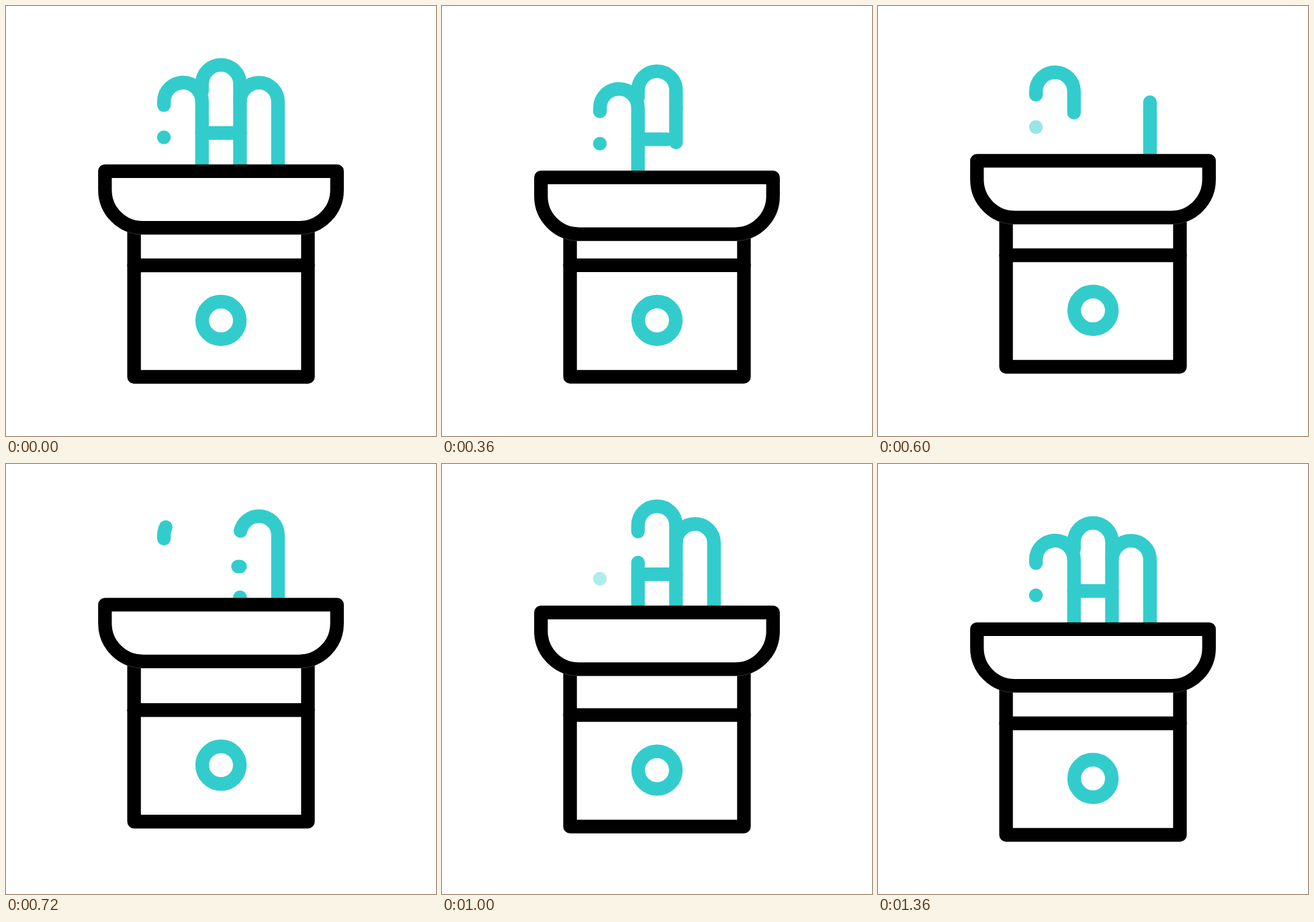
These frames come from a looping animation (640x640 px, 1960 ms). An HTML page:

```html
<!DOCTYPE html>
<html lang="en">
<head>
<meta charset="utf-8">
<title>Fountain</title>
<style>
  html, body { margin: 0; height: 100%; overflow: hidden; background: #fff; }
  svg { display: block; width: 100vw; height: 100vh; }
  path, circle { fill: none; stroke: #000; stroke-width: 20.3; stroke-linecap: round; stroke-linejoin: round; }
  .water { stroke: #3cc; }
  #drop { fill: #3cc; stroke: none; }
  #bowl .rim { fill: #fff; }
  .seam { stroke: #555; stroke-width: .6; stroke-linecap: butt; }
</style>
</head>
<body>
<svg viewBox="0 0 640 640">
  <path id="legs"/>
  <g id="base">
    <path d="M190.6 386H449.4"/>
    <circle class="water" cx="320" cy="468" r="28"/>
  </g>
  <g id="bowl">
    <path class="water" id="right" pathLength="1" d="M404.8 247V142.3A28.25 28.25 0 0 0 348.3 142.3"/>
    <path class="water" id="middle" pathLength="1" d="M348.3 247V116A28.3 28.3 0 0 0 291.7 116V127"/>
    <path class="water" id="bar" pathLength="1" d="M348.3 189H291.7"/>
    <path class="water" id="left" pathLength="1" d="M291.7 247V142.3A28.3 28.3 0 0 0 235.1 142.3V147.5"/>
    <circle id="drop" cx="235" cy="195.5" r="10.2"/>
    <path class="rim" d="M147.3 245.8H492.7V273.7A56.5 56.5 0 0 1 436.2 330.2H203.8A56.5 56.5 0 0 1 147.3 273.7Z"/>
    <path class="seam" d="M180.5 336.2A66.6 66.6 0 0 0 200.8 340.2M459.5 336.2A66.6 66.6 0 0 1 439.2 340.2"/>
  </g>
</svg>
<script>
const LOOP = 1960, STEP = 40;
const el = id => document.getElementById(id);
const smooth = s => s * s * (3 - 2 * s);
const progress = (t, from, to) => Math.min(1, Math.max(0, (t - from) / (to - from)));

// cubic-bezier(.5, 0, .5, 1)
function ease(x) {
  let lo = 0, hi = 1;
  for (let i = 0; i < 20; i++) {
    const s = (lo + hi) / 2;
    if (1.5 * s * (1 - s) + s ** 3 < x) lo = s; else hi = s;
  }
  return smooth(hi);
}

// Each move is [start, end, distance]
const travel = (t, moves) =>
  moves.reduce((sum, [from, to, d]) => sum + (t > from ? d * ease(progress(t, from, to)) : 0), 0);

const bowlMoves = [[80, 400, 9.6], [423, 768, -47.4], [828, 1238, 37.8]];
const baseMoves = [[322, 760, -20], [745, 1325, 20]];

// Each jet is erased from its root, then drawn again: [erase start, end, draw start, end]
const jets = {
  right: [80, 375, 465, 751],
  middle: [268, 563, 672, 1017],
  bar: [268, 563, 672, 1017],
  left: [479, 774, 828, 1238]
};

function trim(id, t) {
  const [e0, e1, d0, d1] = jets[id];
  const erased = t < d0;
  const from = erased ? smooth(progress(t, e0, e1)) : 0;
  const to = erased ? 1 : smooth(progress(t, d0, d1));
  const style = el(id).style;
  style.visibility = to - from > 1e-4 ? 'visible' : 'hidden';
  style.strokeDasharray = `${to - from} 2`;
  style.strokeDashoffset = -from;
}

function render(t) {
  const bowl = travel(t, bowlMoves), base = travel(t, baseMoves);
  el('bowl').setAttribute('transform', `translate(0 ${bowl})`);
  el('base').setAttribute('transform', `translate(0 ${base})`);
  el('legs').setAttribute('d', `M190.6 ${328 + bowl}V${552 + base}H449.4V${328 + bowl}`);
  Object.keys(jets).forEach(id => trim(id, t));
  el('drop').style.opacity = t < 800 ? 1 - progress(t, 480, 720) : smooth(progress(t, 828, 1238));
}

const start = performance.now();
function frame() {
  const t = (performance.now() - start) % LOOP;
  render(Math.floor(t / STEP) * STEP);
  requestAnimationFrame(frame);
}
frame();
</script>
</body>
</html>
```
